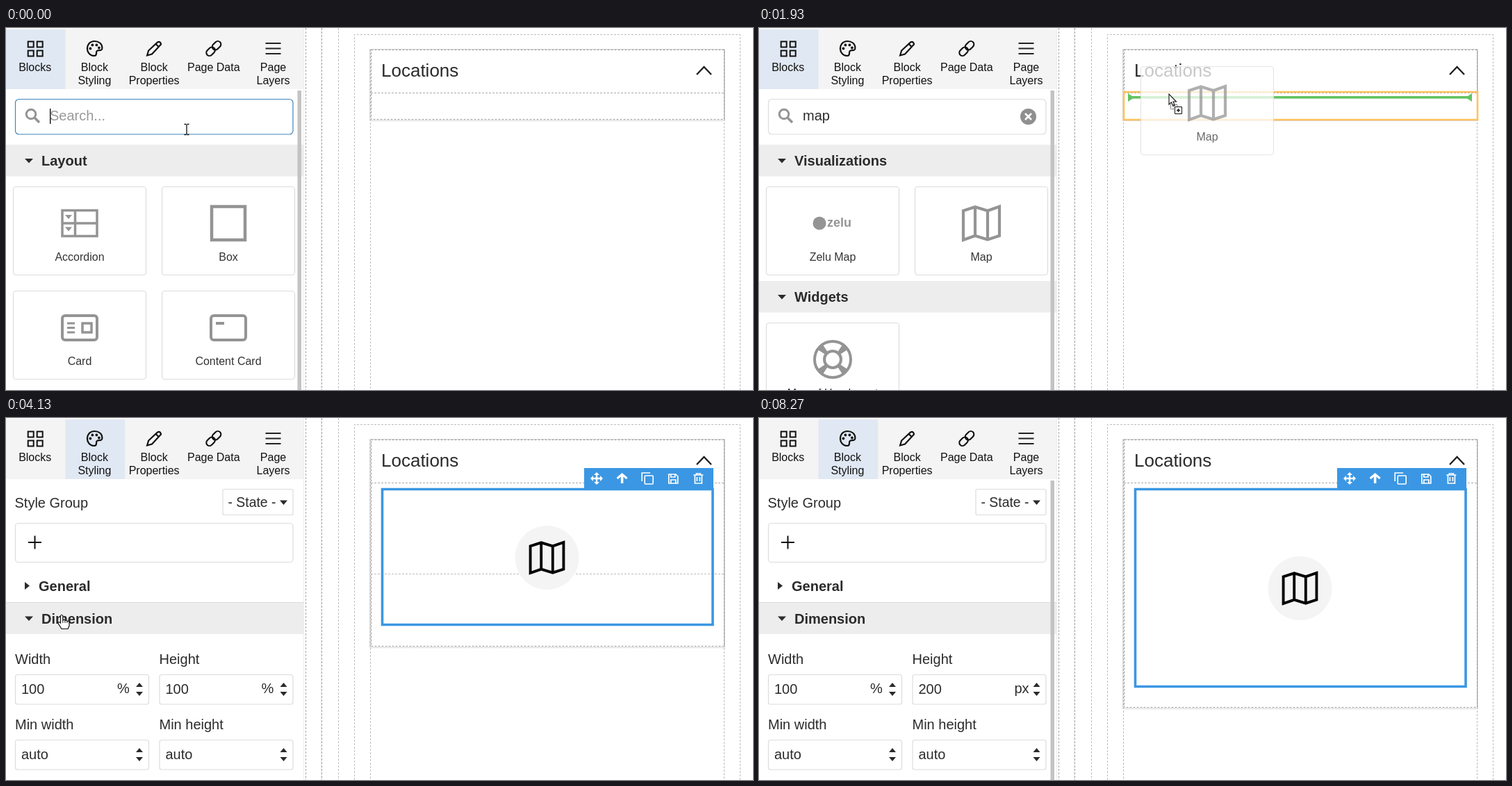
Write an HTML page with a canvas that moves like this. It is 1075 px wide and 521 px high and loops after 8.87 s.

```html
<!DOCTYPE html>
<html lang="en">
<head>
<meta charset="utf-8">
<title>Page builder</title>
<style>
html, body { margin: 0; width: 100%; height: 100%; overflow: hidden; background: #fff }
canvas { display: block }
</style>
</head>
<body>
<canvas id="stage" width="1075" height="521"></canvas>
<script>
const c = document.getElementById('stage').getContext('2d');
const LOOP = 8870, TICK = 200 / 3;
const GREY = '#949494', INK = '#2b2b2b', BLUE = '#3b97e3', EDGE = '#dcdcdc';

// ---------- helpers ----------
function text(s, x, y, size = 20, color = INK, align = 'left', weight = '') {
  c.font = `${weight} ${size}px "Liberation Sans", Arial, sans-serif`;
  c.textAlign = align;
  c.fillStyle = color;
  c.fillText(s, x, y);
}
const bold = (s, x, y) => text(s, x, y, 20, INK, 'left', 'bold');
function rect(x, y, w, h, color) {
  c.fillStyle = color;
  c.fillRect(x, y, w, h);
}
function box(x, y, w, h, stroke, width = 1, r = 0, fill) {
  c.beginPath();
  c.roundRect(x, y, w, h, r);
  if (fill) { c.fillStyle = fill; c.fill(); }
  c.strokeStyle = stroke;
  c.lineWidth = width;
  c.stroke();
}
function line(d, color, width = 1, dash = []) {
  c.setLineDash(dash);
  c.strokeStyle = color;
  c.lineWidth = width;
  c.stroke(new Path2D(d));
  c.setLineDash([]);
}
function shape(d, fill, stroke, width = 1) {
  const p = new Path2D(d);
  c.fillStyle = fill;
  c.fill(p);
  if (stroke) { c.strokeStyle = stroke; c.lineWidth = width; c.stroke(p); }
}
function disc(x, y, r, color) {
  c.beginPath();
  c.arc(x, y, r, 0, 7);
  c.fillStyle = color;
  c.fill();
}
function ring(x, y, r, color, width, from = 0, to = 7) {
  c.beginPath();
  c.arc(x, y, r, from, to);
  c.strokeStyle = color;
  c.lineWidth = width;
  c.stroke();
}
function at(x, y, draw) {
  c.save();
  c.translate(x, y);
  draw();
  c.restore();
}
const dashed = (d, color = '#bdbdbd') => line(d, color, 1, [3, 2]);
const downArrow = (x, y) => shape(`M${x - 6} ${y - 3}h12l-6 6.5z`, INK);

// ---------- icons ----------
function mapIcon(x, y, scale, color) {
  at(x, y, () => {
    c.scale(scale, scale);
    line('M-26-18L-9-23.5L9-18L26-24V18L9 23.5L-9 18L-26 24ZM-9-23V18M9-18V23', color, 4.2);
  });
}
const icons = {
  Accordion() {
    line('M-25-18.5H25V18.5H-25ZM-25 0H25M-6.5-18V18', GREY, 3.5);
    shape('M-21-12h10l-5 6zM-21 5.5h10l-5 6z', GREY);
  },
  Box() { box(-24, -24, 48, 48, GREY, 4.5); },
  Card() {
    box(-25, -17, 50, 35, GREY, 4, 4);
    line('M-18-6H-7M-18 .5H-7M-18 7H-7', GREY, 3);
    box(4, -6, 13, 13, GREY, 3.5);
  },
  'Content Card'() {
    box(-25, -17, 50, 35, GREY, 4, 4);
    line('M-18-6H-6', GREY, 4);
  },
  'Zelu Map'() {
    disc(-19, 0, 9.5, GREY);
    text('zelu', -8, 5, 18, GREY, 'left', 'bold');
  },
  Map() { mapIcon(0, 0, 1, GREY); },
  'Map of Headcount'() {
    ring(0, 0, 26, GREY, 4);
    ring(0, 0, 12, GREY, 4);
    for (let i = 0; i < 4; i++) {
      const a = Math.PI * (i / 2 + .25);
      ring(0, 0, 19, GREY, 12, a - .2, a + .2);
    }
  }
};
const tabs = [
  ['Blocks', () => {
    for (const x of [-10, 3]) for (const y of [-10, 3]) box(x, y, 8, 8, '#111', 2);
  }],
  ['Block|Styling', () => {
    line('M0-10.5C-14-10.5-14 10.5 0 10.5C4 10.5 2 6 3 4C5 1 11 5 11-1C11-7 6-10.5 0-10.5Z', '#111', 2.2);
    for (const [x, y] of [[-6, 0], [-3, -5], [3, -5], [6.5, -1]]) disc(x, y, 1.9, '#111');
  }],
  ['Block|Properties', () =>
    line('M-10 10L-8 3L5-9Q9-11 10-6L-3 8ZM2-7L7-2', '#111', 2.2)],
  ['Page Data', () => {
    c.rotate(-Math.PI / 4);
    box(-13, -4.5, 14, 9, '#111', 2.1, 4.5);
    box(-1, -4.5, 14, 9, '#111', 2.1, 4.5);
  }],
  ['Page|Layers', () => line('M-11-7.5H11M-11 0H11M-11 7.5H11', '#222', 2)]
];
const tools = [
  () => {
    line('M-6 0H6M0-6V6', '#fff', 2.4);
    for (let i = 0; i < 4; i++) { shape('M-4-5L0-9L4-5Z', '#fff'); c.rotate(Math.PI / 2); }
  },
  () => { line('M0 7V-4', '#fff', 3.5); line('M-7 0L0-6L7 0', '#fff', 3); },
  () => { line('M-8 4V-8H4', '#fff', 1.6); box(-4, -4, 12, 12, '#fff', 1.6, 1); },
  () => line('M-6-6H4L7-3V7H-6ZM-3-6V-2H3V-6M-3 7V2H4V7', '#fff', 1.7),
  () => line('M-7-5H7M-3-5V-7H3V-5M-5-5V7H5V-5M-2-2V4M2-2V4', '#fff', 1.7)
];

// ---------- cursors ----------
const cursors = {
  ibeam() { line('M-3.5-7.5H-.5M.5-7.5H3.5M0-7V7M-3.5 7.5H-.5M.5 7.5H3.5', '#111', 1.3); },
  arrow() { shape('M0 0V15L3.5 12L6 17.5L8.5 16.5L6 11H10.5Z', '#fff', '#111', 1.1); },
  copy() {
    cursors.arrow();
    line('M2.5 15V21.5H9M6 15.5H12V18', '#111', 1, [1, 1]);
    box(8.5, 18.5, 10, 10, '#111', 1, 0, '#fff');
    line('M13.5 21V26M11 23.5H16', '#111', 1.3);
  },
  hand() {
    shape('M-1.5 1.5Q0-1 1.8 1.5V8Q4 6 5 8.5Q7 7 8 9.5Q11 8.5 11 12V16L9 20.5H0L-5 12.5Q-4.5 9-1.5 12Z', '#fff', '#111', 1.2);
    line('M1.8 8V12M5 9V12M8 10V12', '#111');
  },
  resize() { shape('M0-10L4-5H1.5V5H4L0 10L-4 5H-1.5V-5H-4Z', '#fff', '#111', 1.1); }
};
// time, x, y
const path = [
  [0, 260, 146], [1130, 260, 146], [1330, 277, 275], [1400, 265, 268], [1930, 590, 95],
  [2070, 592, 95], [3000, 592, 95], [3200, 149, 86], [3330, 149, 86], [3930, 80, 283],
  [4330, 80, 283], [4730, 317, 378], [4870, 317, 378], [5270, 194, 378], [6400, 194, 378],
  [6870, 376, 388], [7330, 376, 388], [7530, 379, 418], [7670, 379, 418], [8270, 90, 540]
];
const looks = [
  [0, 'ibeam'], [1260, 'hand'], [1460, 'copy'], [2320, 'arrow'], [3860, 'hand'],
  [4590, 'ibeam'], [5190, 'resize'], [6590, 'ibeam'], [6790, 'arrow']
];
function pointer(t) {
  const i = path.findIndex(p => p[0] > t);
  if (i < 0) return path.at(-1).slice(1);
  const [t0, x0, y0] = path[i - 1], [t1, x1, y1] = path[i];
  const u = (t - t0) / (t1 - t0), e = u * u * (3 - 2 * u);
  return [x0 + (x1 - x0) * e, y0 + (y1 - y0) * e];
}

// ---------- left panel ----------
function drawTabs(active) {
  rect(0, 0, 428, 88, '#f4f4f4');
  rect(0, 0, 428, 2, '#fafafa');
  rect(active * 85.6, 2, 85.6, 86, '#e0e8f3');
  tabs.forEach(([label, icon], i) => {
    const x = 41.7 + i * 85.7;
    at(x, 29.5, icon);
    label.split('|').forEach((s, row) => text(s, x, 62 + row * 19, 16, '#111', 'center'));
  });
}
function band(label, y) {
  rect(0, y, 428, 45.5, '#ededed');
  downArrow(33, y + 23);
  bold(label, 51, y + 30);
}
function card(label, x, y) {
  box(x + .5, y + .5, 191, 127, EDGE, 1.2, 4, '#fff');
  at(x + 96, y + 53, icons[label]);
  text(label, x + 96, y + 107, 16, '#333', 'center');
}
const scrollbar = () => rect(419.5, 90, 5.5, 431, '#c3c3c3');

function drawBlocks(t) {
  const typed = 'map'.slice(0, t < 200 ? 0 : t < 400 ? 1 : t < 600 ? 2 : 3);
  box(13.5, 102.5, 399.5, 50.5, t < 1460 ? '#3f86bd' : EDGE, 1.2, 5);
  ring(36, 124, 6.8, GREY, 3);
  line('M41 129L48 136', GREY, 3.6);
  text(typed || 'Search...', 63, 133, 20, typed ? INK : '#999');
  if (t < 1200) rect(63 + c.measureText(typed).width, 116, 1.4, 22, '#111');
  if (typed) {
    disc(387.5, 127.5, 11.5, '#8f8f8f');
    line('M383 123L392 132M392 123L383 132', '#fff', 2.6);
  }
  if (t < 660) {
    band('Layout', 168);
    card('Accordion', 10, 228);
    card('Box', 224, 228);
    card('Card', 10, 378);
    card('Content Card', 224, 378);
  } else {
    band('Visualizations', 168);
    card('Zelu Map', 10, 228);
    card('Map', 224, 228);
    band('Widgets', 364);
    card('Map of Headcount', 10, 424);
  }
  scrollbar();
}
function field(label, value, unit, x, y) {
  text(label, x, y - 15);
  box(x + .5, y + .5, 192, 42.5, EDGE, 1.2, 3);
  text(value, x + 9, y + 28);
  text(unit, x + 147, y + 27);
  shape(`M${x + 174} ${y + 18}h10l-5-6zM${x + 174} ${y + 25}h10l-5 6z`, INK);
}
function drawStyling(t) {
  text('Style Group', 12.5, 128.5);
  box(312, 102.5, 101, 37, EDGE, 1.2, 2);
  text('- State -', 319.5, 128, 19.4);
  shape('M394 118.5h11l-5.5 6.5z', INK);
  box(13.5, 151.5, 399.5, 56, EDGE, 1.2, 4);
  line('M32 179H51M41.5 169.5V188.5', '#111', 2);

  const open = t >= 3990;
  ['General', 'Dimension', 'Flex Layout', 'Typography', 'Decorations', 'Extra'].forEach((name, i) => {
    const y = 241.5 + i * 47.2;
    if (open && i) return;
    shape(`M27 ${y - 5.5}v11l7-5.5z`, INK);
    bold(name, 47, y + 7);
    line(`M0 ${Math.round(y + 23.5) + .5}H428`, EDGE);
  });
  if (!open) return;

  band('Dimension', 265.5);
  line('M0 265.5H428', EDGE);
  const height = t < 5660 ? '100' : t < 5790 ? '2' : t < 5920 ? '20' : '200';
  field('Width', '100', '%', 13, 369);
  field('Height', height, t < 7720 ? '%' : 'px', 220.5, 369);
  field('Min width', 'auto', '', 13, 463);
  field('Min height', 'auto', '', 220.5, 463);
  if (t >= 4990 && t < 5660) {
    rect(229, 378, 34, 25, '#0078d7');
    text('100', 229.5, 397, 20, '#fff');
  } else if (t >= 5660 && t < 6860) {
    rect(229 + height.length * 11.1, 379, 1.4, 22, '#111');
  }
  if (t >= 4860) scrollbar();
  if (t >= 6990 && t < 7720) {
    box(363.5, 411.5, 50, 75, '#888', 1, 0, '#fff');
    const hover = t < 7460 ? 1 : 0;
    ['px', '%', 'vh'].forEach((unit, i) => {
      if (i === hover) rect(364, 412 + i * 25, 49, 24.5, '#1e90ff');
      text(unit, 369, 430 + i * 25, 19, i === hover ? '#fff' : INK);
    });
  }
}

// ---------- page canvas ----------
function drawPage(t, x) {
  const dropped = t >= 2460, tall = t >= 7790;
  const bottom = !dropped ? 131.5 : tall ? 416.5 : 328.5;
  rect(428, 0, 647, 521, '#fff');
  line('M428.5 0V521M453.5 0V521', '#eee');
  dashed('M431.5 0V521M454.5 0V521', '#a5a5a5');
  dashed('M478.5 0V521M501.5 521V9.5H1056.5V521M524.5 31V521M1033.5 31V521');
  box(523.5, 30.5, 511, bottom - 28.5, '#d5d5d5');
  dashed(`M525.5 31.5H1033.5V${bottom}H525.5Z`, '#999');
  dashed('M525 93.5H1033', '#aaa');
  text('Locations', 540, 69.5, 26);
  line('M994 67L1004.5 56L1015 67', '#222', 2.4);

  if (dropped) {
    const blockEnd = tall ? 388 : 299, middle = tall ? 245 : 201;
    if (!tall) dashed('M525 224.5H1033');
    disc(778.5, middle, 46, '#f4f4f4');
    mapIcon(778.5, middle, .92, '#000');
    box(541.5, 102.5, 475.5, blockEnd - 104, BLUE, 3.6);
    rect(832, 72, 186, 30, BLUE);
    tools.forEach((icon, i) => at(850 + i * 36.6, 87, icon));
  } else if (t >= 1460 && x > 524) {
    box(525, 92, 509, 40, '#ffc35f', 2.6);
    rect(534, 98, 489, 3.6, '#62c462');
    shape('M531 94L540 100L531 106ZM1026 94L1017 100L1026 106Z', '#62c462');
  }
}

function draw(t) {
  const [x, y] = pointer(t);
  const styling = t >= 3190;
  rect(0, 0, 1075, 521, '#fff');
  if (styling) drawStyling(t); else drawBlocks(t);
  drawTabs(styling ? 1 : 0);
  drawPage(t, x);
  if (t >= 1460 && t < 2320) {
    c.globalAlpha = .74;
    card('Map', x - 41, y - 40);
    c.globalAlpha = 1;
  }
  at(x, y, cursors[looks.findLast(l => l[0] <= t)[1]]);
}

function tick(now) {
  const t = now % LOOP;
  draw(Math.floor(t / TICK + .1) * TICK);
  requestAnimationFrame(tick);
}
requestAnimationFrame(tick);
</script>
</body>
</html>
```
